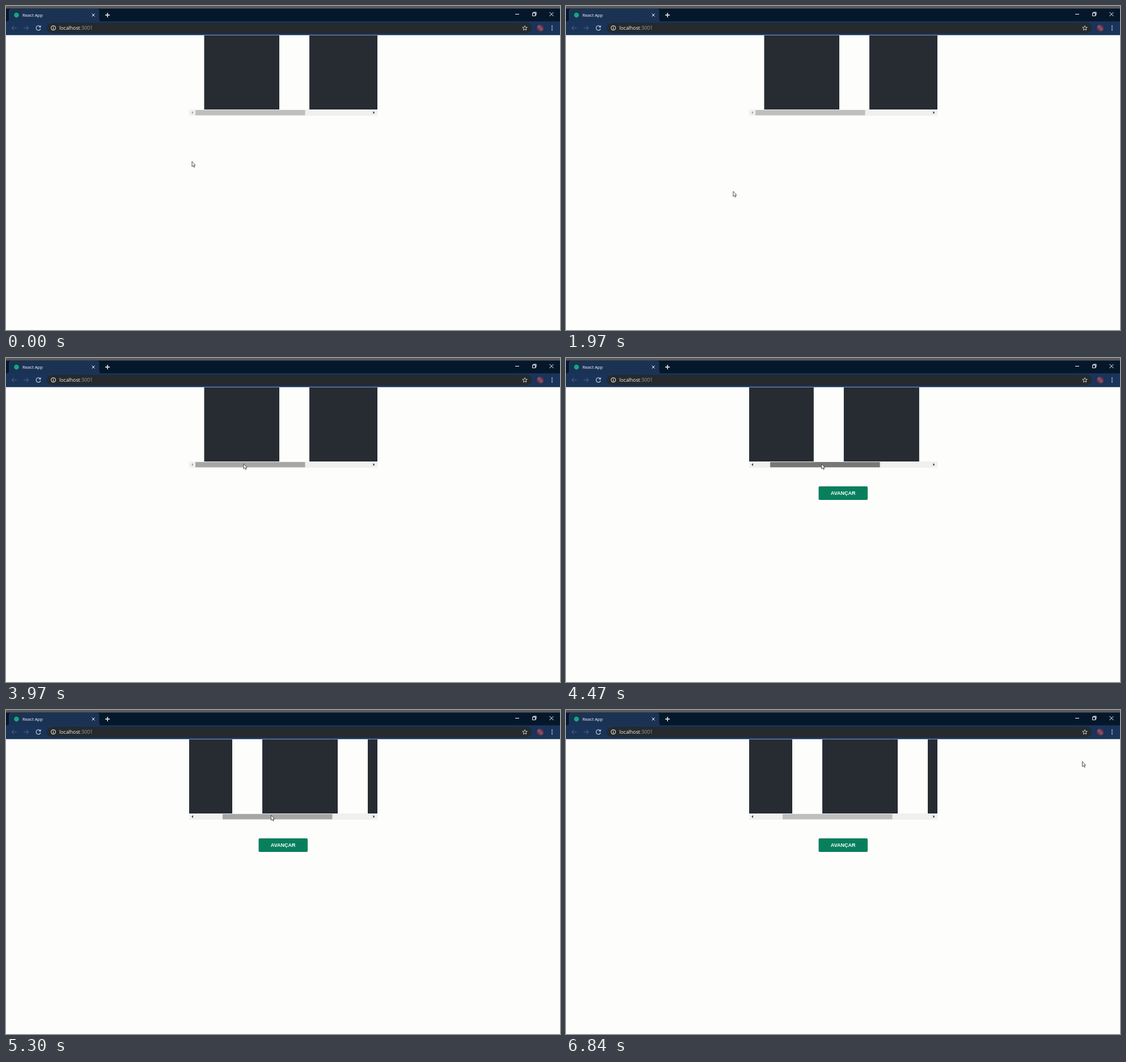
Recreate the animation shown at these times as an HTML page. Size 977 by 573 pixels, loop 7.2 s.

```html
<!DOCTYPE html>
<html lang="pt">
<head>
<meta charset="utf-8">
<title>React App</title>
<style>
  html, body { margin: 0; width: 100%; height: 100%; overflow: hidden; background: #fdfdfc; }
  #stage { display: block; width: 977px; height: 573px; }
  text { font-family: "Open Sans", "Noto Sans", sans-serif; }
  .line { fill: none; stroke: #fff; stroke-width: 1; }
  .soft { stroke: #c3cddb; }
  .dim { stroke: #55698a; }
  .button text { font: bold 9px "Liberation Sans", Arial, sans-serif; fill: #fff; }

  #cursor, #cards, #thumb, #thumb rect, .button, #left { animation: 7.2s linear infinite; }
  #cursor { animation-name: point; }
  #cards { animation-name: scroll; }
  #thumb { animation-name: drag; }
  #thumb rect { animation-name: press; animation-timing-function: step-end; }
  .button { animation-name: appear; animation-timing-function: step-end; }
  #left { animation-name: enable; animation-timing-function: step-end; }

  @keyframes point {
    0%, 6.94% { transform: translate(327.5px, 275px); animation-timing-function: ease-in-out; }
    10.56%, 12.92% { transform: translate(292px, 381px); }
    13.89%, 18.89% { transform: translate(291px, 380px); animation-timing-function: ease-in; }
    27.36% { transform: translate(294px, 328px); }
    28.75% { transform: translate(326px, 295px); animation-timing-function: ease-out; }
    38.47% { transform: translate(390.5px, 229px); }
    38.89% { transform: translate(393px, 224px); animation-timing-function: ease-out; }
    49.03% { transform: translate(412px, 191px); }
    55.14% { transform: translate(418.5px, 187px); }
    59.72% { transform: translate(424px, 187px); }
    62.08% { transform: translate(450px, 187px); animation-timing-function: ease-out; }
    70.83% { transform: translate(472px, 187px); }
    73.61% { transform: translate(467px, 186px); animation-timing-function: ease-in; }
    80.14% { transform: translate(811px, 173px); }
    83.89% { transform: translate(978px, 149px); }
    86.67% { transform: translate(978px, 152px); animation-timing-function: ease-out; }
    95%, 100% { transform: translate(910px, 91px); }
  }
  @keyframes scroll {
    0%, 59.72% { transform: translateX(0); }
    62.08% { transform: translateX(-45px); animation-timing-function: ease-out; }
    70.83%, 100% { transform: translateX(-83px); }
  }
  @keyframes drag {
    0%, 59.72% { transform: translateX(0); }
    62.08% { transform: translateX(26px); animation-timing-function: ease-out; }
    70.83%, 100% { transform: translateX(48px); }
  }
  @keyframes press {
    0% { fill: #bfbfbf; }
    48.6% { fill: #a6a6a6; }
    59.72% { fill: #777; }
    72.2% { fill: #a6a6a6; }
    76.4%, 100% { fill: #bfbfbf; }
  }
  @keyframes appear {
    0% { visibility: hidden; }
    59.8%, 100% { visibility: visible; }
  }
  @keyframes enable {
    0% { fill: #a3a3a3; }
    59.8%, 100% { fill: #404040; }
  }
</style>
</head>
<body>
<svg id="stage" viewBox="0 0 977 573">
  <defs>
    <linearGradient id="photo" x1="0" y1="1" x2="1" y2="0">
      <stop offset="0" stop-color="#251f35"/>
      <stop offset=".5" stop-color="#98505f"/>
      <stop offset="1" stop-color="#2b2438"/>
    </linearGradient>
  </defs>

  <!-- window and tab -->
  <rect width="977" height="51.5" fill="#1a3359"/>
  <rect width="977" height="27" fill="#05182b"/>
  <rect width="977" height="4.5" fill="#5a595a"/>
  <path d="M2 27Q5 27 5 24V9Q5 5 9 5H160Q164.500 5 164.500 9V24Q164.500 27 168 27Z" fill="#1a3354"/>
  <circle cx="18.500" cy="16" r="4.300" fill="#18a878"/>
  <text x="29" y="18.500" font-size="7.700" fill="#fff">React App</text>
  <path class="line" stroke-width="1.200" d="M151.500 13.500l5 5m0-5l-5 5"/>
  <path class="line" style="stroke-width:1.400" d="M175 16h8m-4-4v8"/>
  <path class="line" d="M898 14.500h7M928.500 12.500h5v5h-5zM930 12.500v-1.500h5v5h-1.500M958.500 11l7 7m0-7l-7 7"/>

  <!-- toolbar -->
  <rect x="72" y="29.500" width="855" height="18.500" rx="9.250" fill="#242a2d"/>
  <path class="line dim" d="M19 39h-9m4-4l-4 4 4 4M31 39h9m-4-4l4 4-4 4"/>
  <path class="line soft" style="stroke-width:1.200" d="M60.300 36.500a4 4 0 1 0 .7 3.500"/>
  <path d="M61.500 34v4h-4z" fill="#c3cddb"/>
  <circle class="line" cx="83.500" cy="38.800" r="4"/>
  <path class="line" d="M83.500 36.200v1m0 1v3.200"/>
  <text x="94" y="42" font-size="8.750" fill="#f4f4f4">localhost<tspan fill="#9ba0a3">:3001</tspan></text>
  <path class="line soft" d="M915 34.800l1.200 2.900 3.100.2-2.400 2 .8 3-2.700-1.700-2.700 1.700.8-3-2.400-2 3.100-.2z"/>
  <circle cx="942" cy="39" r="6" fill="url(#photo)"/>
  <g fill="#dce2ea">
    <circle cx="963" cy="35.500" r="1"/><circle cx="963" cy="39" r="1"/><circle cx="963" cy="42.500" r="1"/>
  </g>

  <!-- scrolling strip -->
  <svg x="323" y="51.500" width="332" height="131.500" overflow="hidden">
    <g id="cards" fill="#272c33">
      <rect x="26.500" width="132.500" height="132"/>
      <rect x="212" width="133" height="132"/>
      <rect x="398" width="133" height="132"/>
    </g>
  </svg>
  <rect x="323" y="183" width="332" height="11" fill="#f0f0f0"/>
  <path id="left" d="M330 186v5l-3-2.500z"/>
  <path d="M647.500 186v5l3-2.500z" fill="#404040"/>
  <g id="thumb"><rect x="334" y="184" width="193.500" height="9.300"/></g>

  <g class="button">
    <rect x="445.500" y="227" width="86.500" height="24" rx="2" fill="#077f5d"/>
    <text x="488.700" y="241.500" text-anchor="middle">AVANÇAR</text>
  </g>

  <path id="cursor" d="M.5 0V9L2.500 7.200 4 10.300 5.300 9.700 3.900 6.800H6.500Z" fill="#fff" stroke="#222" stroke-width=".8"/>
</svg>
</body>
</html>
```
